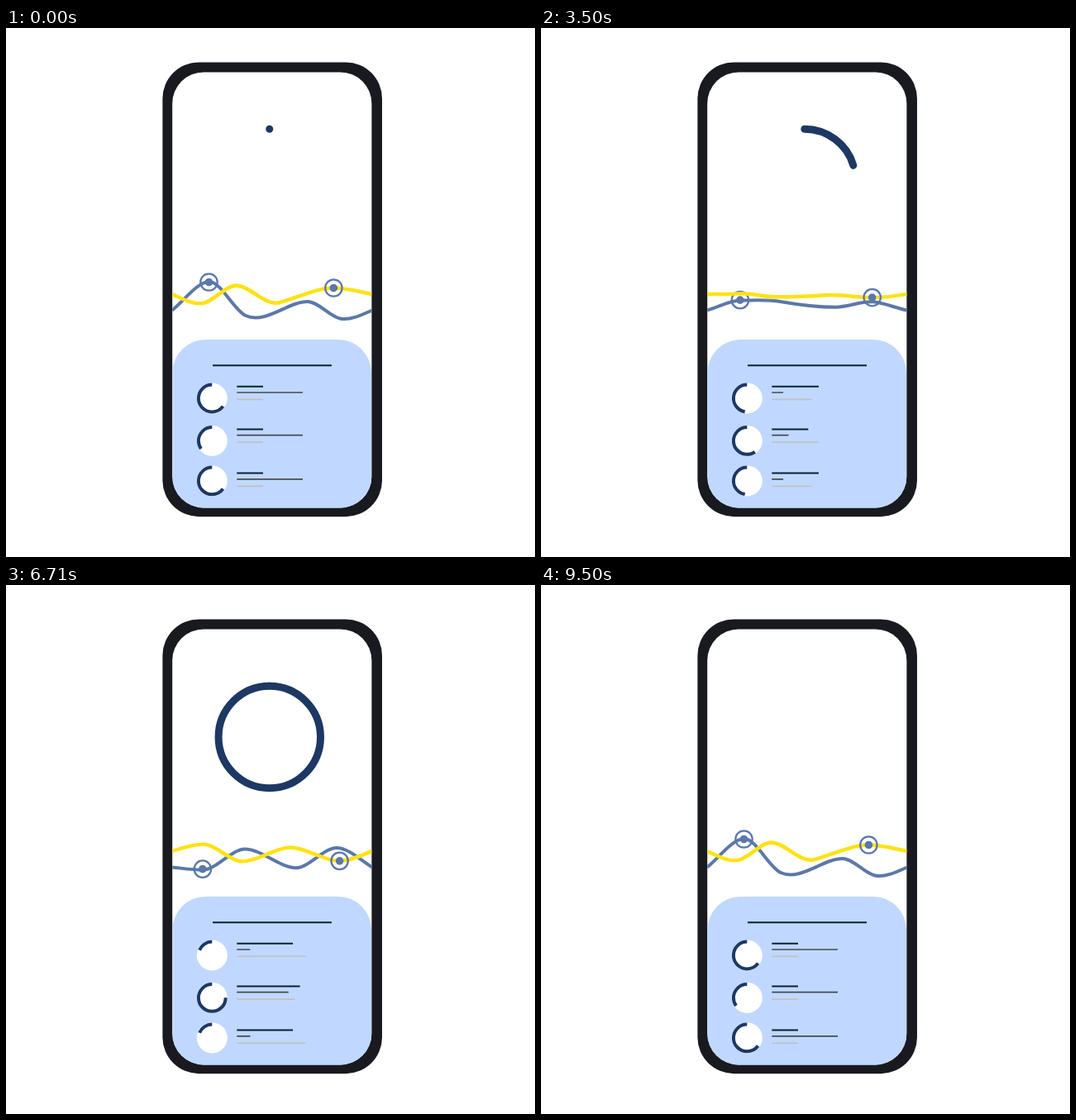
An HTML page with a canvas that plays this animation: 640 px wide and 640 px high, repeating every 9570 ms.

```html
<!DOCTYPE html>
<html lang="en">
<head>
<meta charset="utf-8">
<title>Phone dashboard</title>
<style>
  html, body { margin: 0; width: 100%; height: 100%; overflow: hidden; background: #fff; }
  canvas { display: block; width: 640px; height: 640px; }
</style>
</head>
<body>
<canvas id="stage" width="640" height="640"></canvas>
<script>
const ctx = document.getElementById('stage').getContext('2d');
const LOOP = 9570, END = 9500;
const NAVY = '#1d3863', BLUE = '#5b78a9', YELLOW = '#ffe212', INK = '#0b2032';

const ease = u => u * u * (3 - 2 * u);

// Eased swing: home -> far -> back -> far -> home, turning at the given times.
function swing(home, far, turns, back = home) {
  const times = [0, ...turns, END];
  const stops = [home, far, back, far, home];
  return t => {
    if (t >= END) return home;
    const i = times.findIndex(time => time > t) - 1;
    const u = (t - times[i]) / (times[i + 1] - times[i]);
    return stops[i] + (stops[i + 1] - stops[i]) * ease(u);
  };
}

const morph = swing(0, 1.05, [2440, 4820, 6930]);
const pulse = swing(0, 1, [2950, 4850, 6700]);
const bigDial = t => pulse(t) ** 7;

const outerRow = {
  dial: swing(.65, .08, [2350, 4750, 7280], .92),
  bars: [
    swing(31.5, 79.5, [2600, 4450, 7800]),
    swing(79.5, 10, [3200, 5400, 7000]),
    swing(31.5, 83.5, [2250, 4250, 6600])
  ]
};
const middleRow = {
  dial: swing(.35, .825, [2420, 4650, 7400]),
  bars: [
    swing(31.5, 77, [2350, 4100, 6950]),
    swing(79.5, 10, [2750, 5900, 8400]),
    swing(31.5, 82, [2250, 4750, 7600])
  ]
};
const rows = [
  { y: 448, barY: 433.7, ...outerRow },
  { y: 499.4, barY: 485.4, ...middleRow },
  { y: 547.9, barY: 538.6, ...outerRow }
];
const barStyles = [
  { dy: 0, color: INK, width: 2 },
  { dy: 7.3, color: '#474b52', width: 1.7 },
  { dy: 15.7, color: '#c3bfc3', width: 1.7 }
];

// Wave nodes: x, y, slope.
const blueWave = {
  from: [[201, 341.5, -.8], [246, 307, 0], [290, 348, .45], [365, 331, 0], [404, 351.5, .2], [443, 341.5, -.45]],
  to: [[201, 341.5, .08], [238, 344, 0], [289, 320, 0], [351, 342, 0], [400, 318.5, 0], [443, 341.5, .6]]
};
const yellowWave = {
  from: [[201, 322, .45], [239, 332.8, -.2], [278.5, 311.5, 0], [330, 332.3, -.25], [396, 314.5, 0], [443, 322, .2]],
  to: [[201, 322, -.3], [239, 314, 0], [286, 334, 0], [344, 317.8, 0], [403, 333.5, 0], [443, 321.8, -.4]]
};

const mix = (a, b, p) => a.map((v, i) => v + (b[i] - v) * p);

function line(x1, x2, y, color, width) {
  ctx.strokeStyle = color;
  ctx.lineWidth = width;
  ctx.beginPath();
  ctx.moveTo(x1, y);
  ctx.lineTo(x2, y);
  ctx.stroke();
}

function box(x, y, w, h, radii, color) {
  ctx.fillStyle = color;
  ctx.beginPath();
  ctx.roundRect(x, y, w, h, radii);
  ctx.fill();
}

function disc(x, y, r, color) {
  ctx.fillStyle = color;
  ctx.beginPath();
  ctx.arc(x, y, r, 0, Math.PI * 2);
  ctx.fill();
}

// Arc from twelve o'clock; a negative share runs anticlockwise.
function dial(x, y, r, share, color, width) {
  const top = -Math.PI / 2;
  ctx.strokeStyle = color;
  ctx.lineWidth = width;
  ctx.beginPath();
  ctx.arc(x, y, r, top, top + share * Math.PI * 2, share < 0);
  ctx.stroke();
}

function wave({ from, to }, p, color, width) {
  const nodes = from.map((node, i) => mix(node, to[i], p));
  ctx.strokeStyle = color;
  ctx.lineWidth = width;
  ctx.beginPath();
  ctx.moveTo(nodes[0][0], nodes[0][1]);
  for (let i = 1; i < nodes.length; i++) {
    const [x1, y1, s1] = nodes[i - 1], [x2, y2, s2] = nodes[i];
    const reach = (x2 - x1) * .32;
    ctx.bezierCurveTo(x1 + reach, y1 + s1 * reach, x2 - reach, y2 - s2 * reach, x2, y2);
  }
  ctx.stroke();
}

function marker([x, y]) {
  dial(x, y, 10.2, 1, BLUE, 2.3);
  disc(x, y, 4.8, BLUE);
}

function draw(t) {
  ctx.fillStyle = '#fff';
  ctx.fillRect(0, 0, 640, 640);
  box(189.4, 41.4, 265.6, 549.8, 44, '#191a20');
  box(201.2, 53.4, 241.2, 527, 38, '#fff');

  ctx.save();
  ctx.beginPath();
  ctx.roundRect(201.2, 53.4, 241.2, 527, 38);
  ctx.clip();

  const share = bigDial(t);
  if (share > 0) {
    ctx.lineCap = 'round';
    dial(318.8, 184, 61.7, share, NAVY, 9);
    ctx.lineCap = 'butt';
  }

  const p = morph(t);
  wave(blueWave, p, BLUE, 4);
  marker(mix([245.5, 307.5], [238, 343], p));
  wave(yellowWave, p, YELLOW, 4.4);
  marker(mix([396.4, 314.5], [403.5, 333.5], p));

  box(201.4, 377, 240.6, 205, [40, 40, 0, 0], '#c0d8ff');
  line(250, 394, 408.3, INK, 1.9);

  for (const row of rows) {
    disc(249.3, row.y, 18.5, '#fff');
    dial(249.3, row.y, 16.4, -row.dial(t), NAVY, 4);
    barStyles.forEach(({ dy, color, width }, i) =>
      line(279.3, 279.5 + row.bars[i](t), row.barY + dy, color, width));
  }
  ctx.restore();
}

function frame() {
  draw(performance.now() % LOOP);
  requestAnimationFrame(frame);
}
frame();
</script>
</body>
</html>
```
